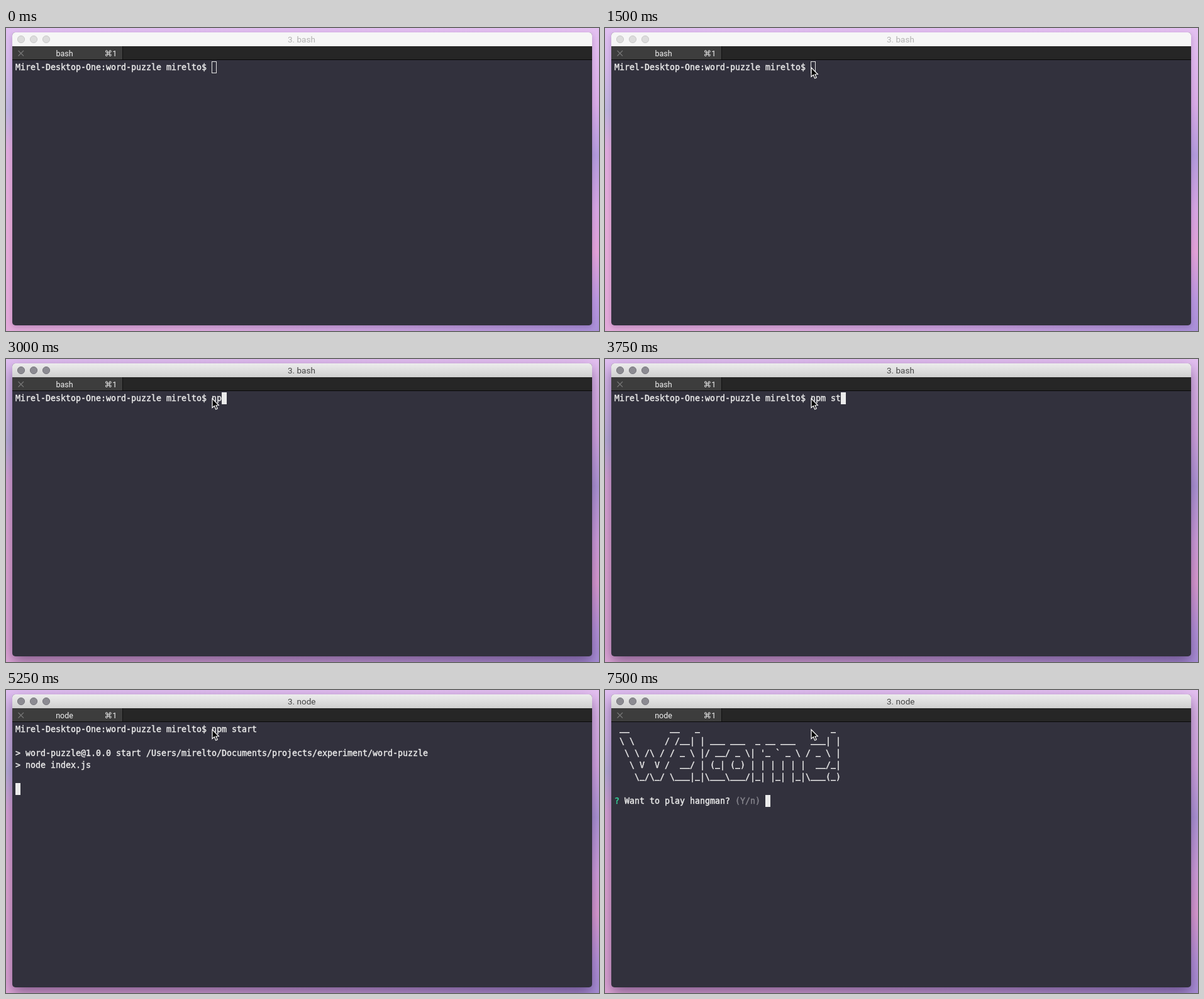
Recreate the animation shown at these times as an HTML page with a canvas. Size 943x482 px, loop 8 s.

```html
<!DOCTYPE html>
<html lang="en">
<head>
<meta charset="utf-8">
<title>Terminal</title>
<style>
  html, body { margin: 0; width: 100%; height: 100%; overflow: hidden; }
  canvas { display: block; }
</style>
</head>
<body>
<canvas id="stage" width="943" height="482"></canvas>
<script>
const ctx = document.getElementById('stage').getContext('2d');
const W = 943, H = 482, LOOP = 8000, TICK = 250;
const WIN = { x: 10, y: 7, w: 922, h: 466 };
const COL = 8, ROW = 19, LEFT = 15, TOP = 53;
const INK = '#e8e8e8', GREEN = '#35d39a', GREY = '#85848c';

const PROMPT = 'Mirel-Desktop-One:word-puzzle mirelto$ ';
const COMMAND = 'npm start';
const TYPED = [0, 1, 2, 3, 4, 6, 8, 9];   // letters shown per tick
const TYPE_START = 2500;
const POINTER = [[641, 147], [533, 113], [425, 86], [369, 80], [337, 64], [327, 62]];
const LAUNCH = [
  '> word-puzzle@1.0.0 start /Users/mirelto/Documents/projects/experiment/word-puzzle',
  '> node index.js'
];
const BANNER = String.raw`
 __        __   _                          _
 \ \      / /__| | ___ ___  _ __ ___   ___| |
  \ \ /\ / / _ \ |/ __/ _ \| '_ ~ _ \ / _ \ |
   \ V  V /  __/ | (_| (_) | | | | | |  __/_|
    \_/\_/ \___|_|\___\___/|_| |_| |_|\___(_)`.replace('~', '`').split('\n').slice(1);

function gradient(x, y, stops) {
  const g = ctx.createLinearGradient(0, 0, x, y);
  for (const [at, color] of stops) g.addColorStop(at, color);
  return g;
}

function rect(x, y, w, h, color) {
  ctx.fillStyle = color;
  ctx.fillRect(x, y, w, h);
}

function drawDesktop() {
  rect(0, 0, W / 2, H, gradient(0, H, [[0, '#e0bff1'], [.14, '#d2b6e9'], [.27, '#bdb2de'],
    [.4, '#dfaadd'], [.65, '#e6abd9'], [1, '#e2a9da']]));
  rect(W / 2, 0, W / 2, H, gradient(0, H, [[0, '#e4c0f1'], [.25, '#d9abe7'], [.42, '#b39bdd'],
    [.6, '#d6a4e2'], [.74, '#e2a1d8'], [.9, '#b896df'], [1, '#a98fd8']]));
  rect(10, 0, 922, 20, gradient(W, 0, [[0, '#e0bff1'], [.5, '#e1bdf0'], [1, '#e4c0f1']]));
  rect(10, 460, 922, 22, gradient(W, 0, [[0, '#e2a9da'], [.3, '#dda9dd'], [.6, '#cba2df'], [1, '#a98fd8']]));
}

function label(text, x, y, size, color, align = 'center') {
  ctx.font = `${size}px Roboto, "DejaVu Sans", sans-serif`;
  ctx.textAlign = align;
  ctx.fillStyle = color;
  ctx.fillText(text, x, y);
}

function drawWindow(active, job) {
  const { x, y, w, h } = WIN;
  ctx.save();
  ctx.beginPath();
  ctx.roundRect(x, y, w, h, 5);
  ctx.shadowColor = active ? 'rgba(40,15,60,.5)' : 'rgba(40,15,60,.22)';
  ctx.shadowBlur = active ? 22 : 10;
  ctx.shadowOffsetY = active ? 9 : 3;
  ctx.fillStyle = '#32313d';
  ctx.fill();
  ctx.shadowColor = 'transparent';
  ctx.clip();

  rect(x, y, w, 22, active ? gradient(0, 29, [[.25, '#ececec'], [1, '#d0d0d0']]) : '#f6f6f6');
  rect(x, 29, w, 22, '#262626');
  rect(x, 29, 175, 21, '#3d3d3d');
  rect(185, 29, 1, 21, '#111');
  rect(x, 50, w, 1, '#080808');
  ctx.restore();

  ctx.lineWidth = 1;
  ctx.fillStyle = active ? '#8c8b92' : '#dcdcdc';
  ctx.strokeStyle = active ? '#77767d' : '#c9c9c9';
  for (const cx of [24, 44, 64]) {
    ctx.beginPath();
    ctx.arc(cx, 18, 5.6, 0, 7);
    ctx.fill();
    ctx.stroke();
  }
  label('3. ' + job, 448, 23, 13.5, active ? '#454545' : '#b2b2b2', 'left');
  label(job, 93, 45, 12.5, '#f2f2f2');
  label('⌘1', 166.5, 45, 12.5, '#f2f2f2');

  ctx.strokeStyle = '#777';
  ctx.lineWidth = 1.2;
  ctx.beginPath();
  ctx.moveTo(19.5, 36); ctx.lineTo(28, 44.5);
  ctx.moveTo(28, 36); ctx.lineTo(19.5, 44.5);
  ctx.stroke();
}

function print(text, row, col = 0, color = INK) {
  ctx.font = '13.29px "DejaVu Sans Mono", monospace';
  ctx.textAlign = 'left';
  ctx.fillStyle = ctx.strokeStyle = color;
  ctx.lineWidth = .45;
  const base = TOP + row * ROW + 14;
  [...text].forEach((ch, i) => {
    const x = LEFT + (col + i) * COL;
    if (ch === '_') ctx.fillRect(x, base, COL, 1.5);
    else if (ch !== ' ') {
      ctx.fillText(ch, x, base);
      ctx.strokeText(ch, x, base);
    }
  });
}

function drawCaret(row, col, solid) {
  const x = LEFT + col * COL, y = TOP + row * ROW;
  if (solid) return rect(x, y, COL, ROW, '#ebebeb');
  ctx.strokeStyle = '#e4e4e4';
  ctx.lineWidth = 1;
  ctx.strokeRect(x + .5, y + .5, COL - 1, ROW - 1);
}

function drawPointer([x, y]) {
  ctx.save();
  ctx.translate(x + 1, y + 1);
  ctx.beginPath();
  ctx.moveTo(0, 0);
  for (const [px, py] of [[0, 14.5], [3.4, 11.5], [5.6, 17], [8.2, 16], [5.9, 10.7], [10.3, 10.5]])
    ctx.lineTo(px, py);
  ctx.closePath();
  ctx.fillStyle = '#000';
  ctx.strokeStyle = '#fff';
  ctx.lineWidth = 1.2;
  ctx.fill();
  ctx.stroke();
  ctx.restore();
}

function drawScreen(t) {
  if (t >= 6000) {
    BANNER.forEach((line, row) => print(line, row));
    print('?', 6, 0, GREEN);
    print('Want to play hangman?', 6, 2);
    print('(Y/n)', 6, 24, GREY);
    return drawCaret(6, 30, true);
  }
  const step = Math.floor((t - TYPE_START) / TICK);
  const count = TYPED[Math.max(0, Math.min(step, TYPED.length - 1))];
  print(PROMPT + COMMAND.slice(0, count), 0);
  if (t >= 5250) {
    LAUNCH.forEach((line, i) => print(line, 2 + i));
    drawCaret(5, 0, true);
  } else if (t >= 4500) drawCaret(1, 0, true);
  else drawCaret(0, PROMPT.length + count, t >= 1750);
}

const start = performance.now();
function frame() {
  const t = (performance.now() - start) % LOOP;
  drawDesktop();
  drawWindow(t >= 1750, t >= 5000 ? 'node' : 'bash');
  drawScreen(t);
  const stop = Math.floor(t / TICK) - 1;
  if (stop >= 0) drawPointer(POINTER[Math.min(stop, POINTER.length - 1)]);
  requestAnimationFrame(frame);
}
frame();
</script>
</body>
</html>
```
